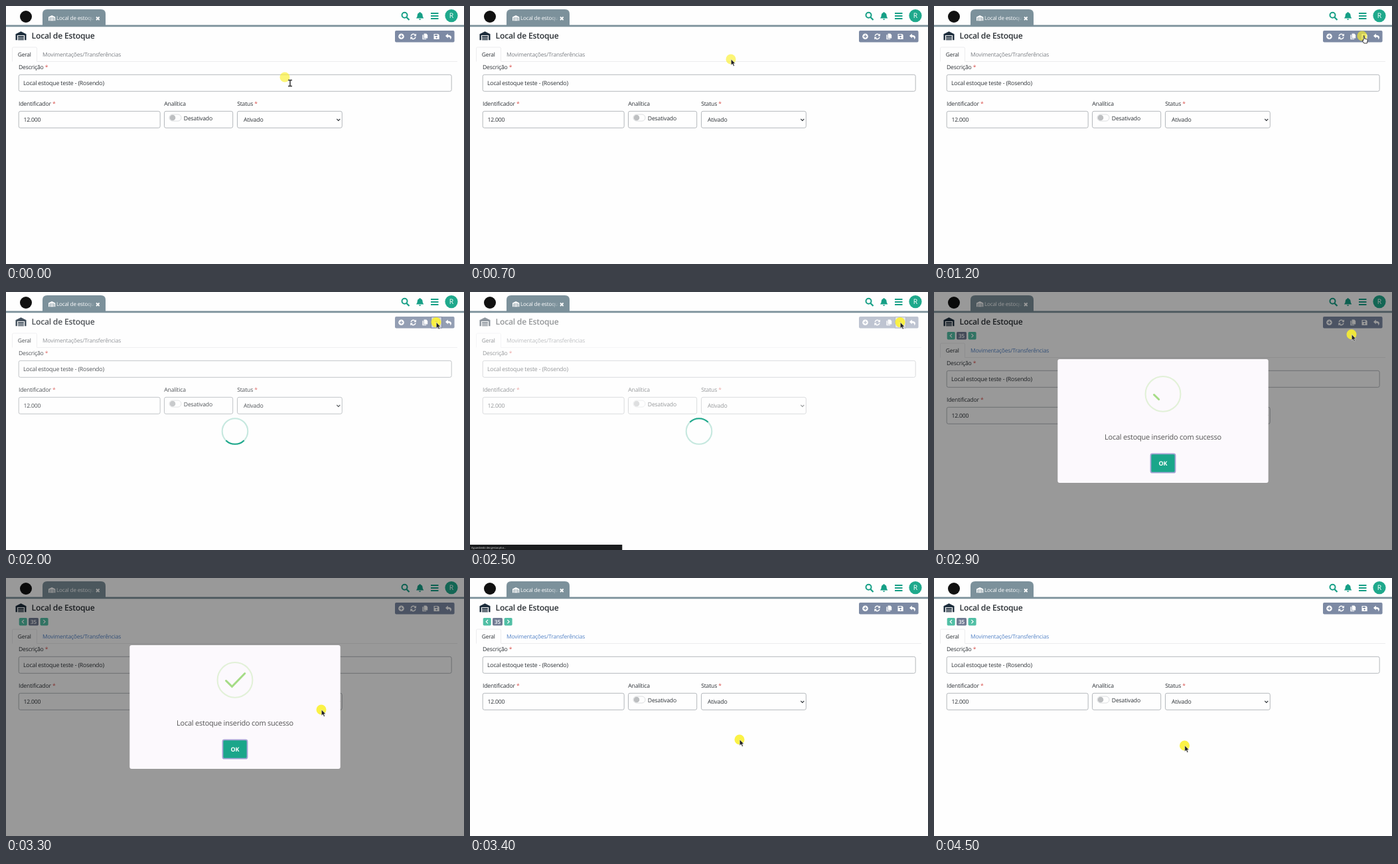
An HTML page for the animation above (4.6 s loop, 690x388 px).

```html
<!DOCTYPE html>
<html lang="pt">
<head>
<meta charset="utf-8">
<title>Local de Estoque</title>
<style>
html, body { margin: 0; width: 100%; height: 100%; overflow: hidden; background: #fefefe; }
svg { display: block; width: 690px; height: 388px; }
text { font: 8.65px "Open Sans", "Noto Sans", sans-serif; letter-spacing: -.02em; fill: #2b3035; text-rendering: geometricPrecision; }
tspan { fill: #d9534f; }
.box { fill: #fefefe; stroke: #b4b8bc; }
.line { fill: none; stroke: #fff; stroke-width: 1.5; }
.teal { fill: #169f86; }
.white, .white text { fill: #fff; }
</style>
</head>
<body>
<svg viewBox="0 0 690 388">
  <defs>
    <path id="store" d="M0 13V4L8 0L16 4V13H13.6V5.6H2.4V13ZM3.6 6.8H12.4V8.4H3.6ZM3.6 9.2H12.4V10.7H3.6ZM3.6 11.5H12.4V13H3.6Z"/>
    <linearGradient id="fade"><stop stop-color="#7c919b" stop-opacity="0"/><stop offset="1" stop-color="#7c919b"/></linearGradient>
  </defs>
  <rect width="690" height="388" fill="#fefefe"/>

  <!-- header -->
  <circle cx="30" cy="16" r="9" fill="#111"/>
  <path d="M55 30V12Q55 5 62 5H143Q150 5 150 12V30Z" fill="#7c919b"/>
  <rect y="28.5" width="690" height="2.8" fill="#7c919b"/>
  <g class="white">
    <use href="#store" transform="translate(64 14) scale(.64)"/>
    <text x="76" y="21" style="font-size:8.1px">Local de estoqu</text>
    <path class="line" style="stroke-width:1.8" d="M136 16.5l4.6 4.6m0-4.6l-4.6 4.6"/>
  </g>
  <rect x="121" y="12" width="13" height="14" fill="url(#fade)"/>
  <g fill="none" stroke="#169f86">
    <circle cx="600.5" cy="13.8" r="4" stroke-width="2"/>
    <path d="M603.5 17l4 4" stroke-width="2.3"/>
    <path d="M640 11h11.5m-11.5 4h11.5m-11.5 4h11.5" stroke-width="1.8"/>
  </g>
  <path class="teal" d="M618 18.6Q619.8 17 619.8 13.6Q620 10.6 622.9 10V9H624.3V10Q627.3 10.6 627.5 13.6Q627.5 17 629.3 18.6ZM622 19.4H625.2Q624.9 21 623.6 21Q622.3 21 622 19.4Z"/>
  <circle cx="671" cy="14.6" r="9.6" fill="#1fa98c"/>
  <text x="671" y="18.4" text-anchor="middle" style="font-size:10.5px;fill:#fff">R</text>

  <!-- page -->
  <use href="#store" x="14.5" y="38.3" fill="#1d2d3c"/>
  <text x="38.6" y="49.2" style="font-size:12.2px;font-weight:600">Local de Estoque</text>
  <rect x="586" y="37" width="89.6" height="17.6" rx="2" fill="#7d8aa4"/>
  <rect id="focus" x="640.5" y="37.5" width="16" height="16.6" fill="#c3c7d6" stroke="#68748f"/>
  <g class="white">
    <circle cx="595.5" cy="45.8" r="4.3"/>
    <path class="line" style="stroke:#7d8aa4;stroke-width:1.2" d="M593 45.8h5m-2.5-2.5v5"/>
    <path class="line" d="M610.2 45.2A3.6 3.6 0 0 1 616.6 43.6M617 46.6A3.6 3.6 0 0 1 610.6 48.2"/>
    <path d="M618 41.4V45.2H614.2ZM609.2 50.4V46.6H613Z"/>
    <path d="M629.6 41.5H633.3L635.2 43.4V48.4H629.6ZM627.4 43.3H628.8V49.2H633.2V50.3H627.4Z"/>
    <path d="M644.5 42H651L652.7 43.7V50H644.5Z"/>
    <path d="M645.8 43H650V45H645.8ZM647.4 47.5a1.2 1.2 0 1 0 2.4 0a1.2 1.2 0 1 0-2.4 0" fill="#7d8aa4"/>
    <path d="M662 45L665.8 41.6V43.7Q671 43.7 671 47.2Q671 49.2 669.2 50.4Q670.2 46.5 665.8 46.5V48.4Z"/>
  </g>
  <g id="pager">
    <rect x="19.7" y="60" width="12" height="11.4" rx="1.6" fill="#51bfa5"/>
    <rect x="51.6" y="60" width="12" height="11.4" rx="1.6" fill="#51bfa5"/>
    <rect x="34" y="60" width="15" height="11.4" rx="1.6" fill="#717b93"/>
    <path class="line" style="stroke-width:1.2" d="M27 63l-2.7 2.7l2.7 2.7M56.4 63l2.7 2.7l-2.7 2.7"/>
    <text x="41.5" y="68.6" text-anchor="middle" style="font-size:8px;font-weight:600;fill:#fff">35</text>
  </g>
  <g id="form">
    <path d="M9.5 83.5V64Q9.5 62 11.5 62H44.5Q46.5 62 46.5 64V83.5H680" fill="none" stroke="#ececee"/>
    <text x="17.8" y="76" style="font-size:8.4px">Geral</text>
    <text id="tab" x="55" y="76" style="font-size:8.47px">Movimentações/Transferências</text>
    <text x="19" y="94.8">Descrição <tspan>*</tspan></text>
    <rect class="box" x="19.2" y="103.3" width="652" height="25" rx="2.5"/>
    <text x="26" y="119" style="font-size:8.75px">Local estoque teste - (Rosendo)</text>
    <text x="19" y="149.8">Identificador <tspan>*</tspan></text>
    <rect class="box" x="19.2" y="158.3" width="213" height="25" rx="2.5"/>
    <text x="26.4" y="174">12.000</text>
    <text x="238.3" y="149.8">Analítica</text>
    <rect class="box" x="238.5" y="158.3" width="103.2" height="25" rx="2.5"/>
    <rect x="246" y="163" width="18" height="10" rx="5" fill="#fefefe" stroke="#dcdee0"/>
    <circle cx="251" cy="168" r="4.3" fill="#bdbfc1"/>
    <text x="267.8" y="171.6">Desativado</text>
    <text x="348.2" y="149.8">Status <tspan>*</tspan></text>
    <rect class="box" x="348.5" y="158.3" width="157.8" height="25" rx="2.5"/>
    <text x="358" y="174" style="font-size:8.8px">Ativado</text>
    <path class="line" style="stroke:#2b3035;stroke-width:1.2" d="M498.3 169.8l2.5 2.5l2.5-2.5"/>
  </g>

  <!-- loading -->
  <rect id="veil" y="35" width="690" height="353" fill="#fff"/>
  <g id="spinner" fill="none" stroke-width="2.1">
    <circle cx="345" cy="209.5" r="19.3" stroke="#c6e8df"/>
    <path id="arc" d="M331.35 195.85A19.3 19.3 0 0 1 358.65 195.85" stroke="#1fa88c"/>
  </g>

  <!-- dialog -->
  <rect id="shade" width="690" height="388" fill="#000" opacity=".4"/>
  <g id="dialog">
    <rect id="panel" x="186.3" y="101" width="317.4" height="186" rx="3" fill="#fefefe"/>
    <circle cx="345" cy="153.4" r="26.4" fill="none" stroke="#e2f1d8" stroke-width="2.1"/>
    <path id="check" d="M331.5 154.5L340.5 163.3L359.8 143.5" pathLength="1" stroke-dasharray="1 2" fill="none" stroke="#a5dc86" stroke-width="3" stroke-linecap="round"/>
    <text x="345" y="222.3" text-anchor="middle" style="font-size:10.98px;fill:#545454">Local estoque inserido com sucesso</text>
    <rect x="326.5" y="243.3" width="37" height="28.4" rx="2.5" fill="#1aa68a" stroke="#a3a2d4" stroke-width="1.8"/>
    <text x="345" y="261.2" text-anchor="middle" style="font-size:9px;font-weight:700;fill:#fff">OK</text>
  </g>
  <g id="status">
    <rect y="380" width="229.3" height="8" fill="#1b1d1f"/>
    <text x="2" y="385.8" style="font-size:3.9px;fill:#e4e4e4">Aguardando dev.gestao.plus...</text>
  </g>

  <g id="pointer">
    <circle id="halo" r="7.5" fill="#faf02c"/>
    <path id="beam" d="M5 4.6H11M5 13.4H11M8 4.6V13.4" fill="none" stroke="#333" stroke-width="1.5"/>
    <path id="arrow" d="M.3 0V9L2.4 7.1L3.9 10.4L5.4 9.7L4 6.6H6.7Z" fill="#222" stroke="#fff" stroke-width=".5"/>
    <path id="hand" d="M2 .2Q3.4-.4 3.6 1V4.2L7.4 5Q8.4 5.4 8.2 6.8L7.4 11H2.8L.2 7Q.4 5.8 2 7Z" fill="#fff" stroke="#222" stroke-width=".9"/>
  </g>
</svg>
<script>
const LOOP = 4600, STEP = 100;
const $ = id => document.getElementById(id);
const set = (id, name, value) => $(id).setAttribute(name, value);
const show = (id, on) => set(id, 'visibility', on ? 'visible' : 'hidden');

// time, then one or more values
const path = [
  [0, 420, 107], [100, 392, 90], [200, 375.5, 82], [600, 375.5, 82],
  [700, 393, 80], [900, 515, 63], [1100, 632, 47], [1200, 645, 45],
  [1900, 645, 45], [2000, 648, 45.6], [2800, 648, 45.6], [3000, 610, 82],
  [3300, 475, 198], [3400, 406, 243], [3500, 385, 248], [3700, 373.5, 249.5],
  [4000, 373.5, 249.5], [4500, 377.5, 252]
];
const veil = [[1900, 0], [2200, .5], [2600, .5], [2800, 0]];
const scale = [[2600, .977], [2800, 1]];
const check = [[2800, 0], [3200, 1]];

function at(keys, t) {
  if (t <= keys[0][0]) return keys[0].slice(1);
  const i = keys.findIndex(k => k[0] >= t);
  if (i < 0) return keys[keys.length - 1].slice(1);
  const a = keys[i - 1], b = keys[i], u = (t - a[0]) / (b[0] - a[0]);
  return a.slice(1).map((v, j) => v + (b[j + 1] - v) * u);
}

function draw(t) {
  const saved = t >= 2700, open = t >= 2600 && t < 3400, busy = t >= 2000 && t < 2600;
  show('pager', saved);
  set('form', 'transform', `translate(0 ${saved ? 15 : 0})`);
  $('tab').style.fill = saved ? '#5483c6' : '#7b7f84';
  show('focus', busy);
  set('veil', 'opacity', at(veil, t)[0]);
  show('spinner', busy);
  set('arc', 'transform', `rotate(${(t - 2500) * .36} 345 209.5)`);
  show('status', t >= 2200 && !saved);

  show('shade', open);
  show('dialog', open);
  const s = at(scale, t)[0], drawn = at(check, t)[0];
  set('dialog', 'transform', `translate(345 194) scale(${s}) translate(-345 -194)`);
  set('panel', 'fill', saved ? '#fcf9fd' : '#fefefe');
  set('check', 'stroke-dashoffset', 1 - drawn);
  set('check', 'opacity', drawn ? 1 : 0);

  set('pointer', 'transform', `translate(${at(path, t)})`);
  set('halo', 'opacity', t < 2000 ? .65 : .88);
  const kind = t < 400 ? 'beam' : t >= 1100 && t < 2000 ? 'hand' : 'arrow';
  for (const id of ['beam', 'arrow', 'hand']) show(id, id === kind);
}

function tick() {
  draw(Math.floor(performance.now() % LOOP / STEP) * STEP);
  requestAnimationFrame(tick);
}
tick();
</script>
</body>
</html>
```
